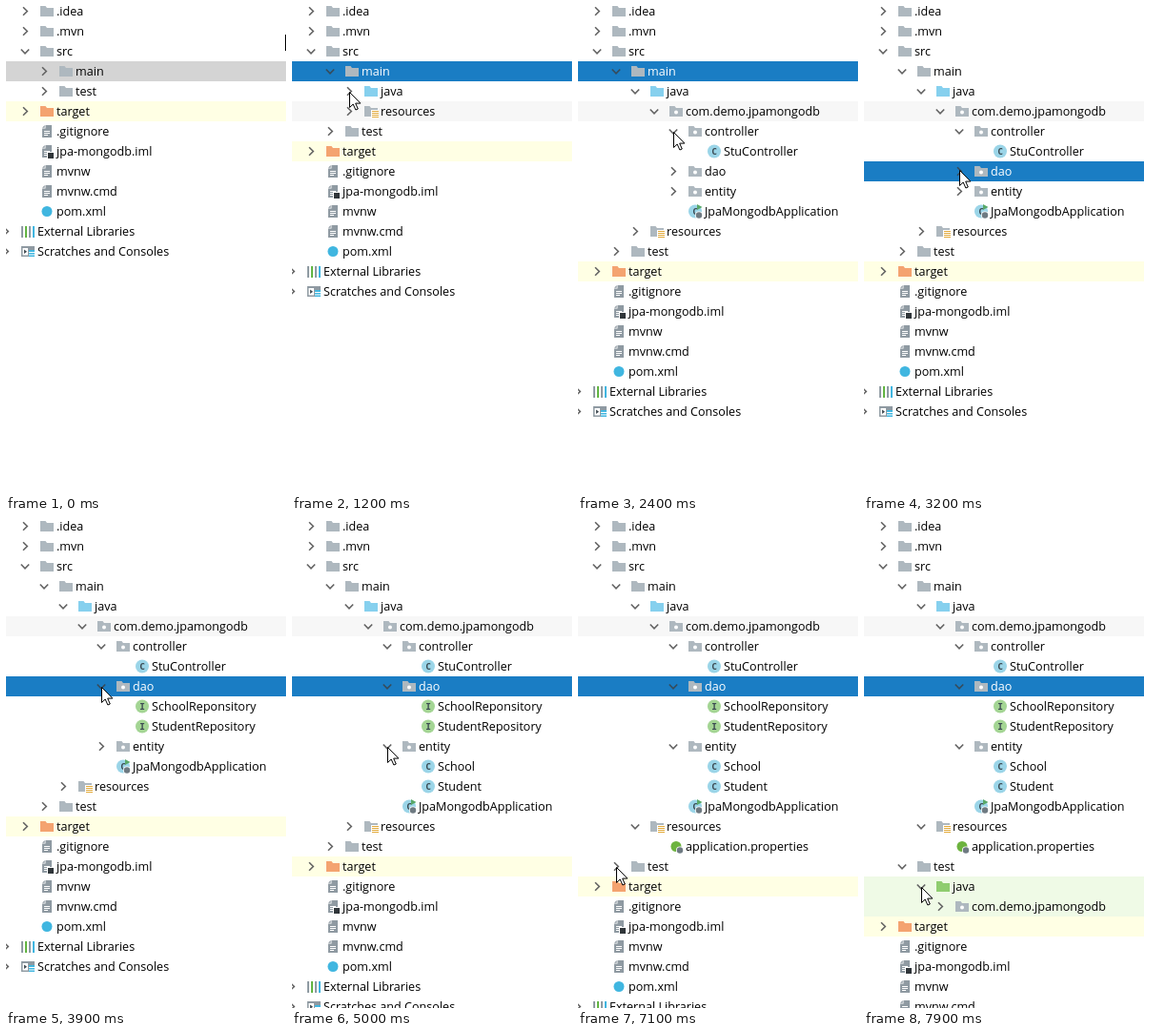
An HTML page for the animation above (8000 ms loop, 294x511 px).

```html
<!DOCTYPE html>
<html lang="en">
<head>
<meta charset="utf-8">
<title>Project tree</title>
<style>
  html, body { margin: 0; width: 100%; height: 100%; overflow: hidden; background: #fff; }
  #tree { position: absolute; left: 0; top: -5px; width: 294px; }
  #tree svg { display: block; }
  #tree text { font: 12.6px "Open Sans", "Noto Sans", sans-serif; fill: #000; }
  #tree .letter { font: bold 9.5px "DejaVu Sans Mono", monospace; fill: #3b4a52; text-anchor: middle; }
  #tree .gray { background: #d4d4d4; }
  #tree .blue { background: #1a7dc4; }
  #tree .blue .label { fill: #fff; }
  .chev { fill: none; stroke: #636363; stroke-width: 1.6; }
  .blue .chev { stroke: #374b5a; }
  #hover { position: absolute; left: 0; top: 100px; width: 294px; height: 21px; background: #f7f7f7; }
  #beam { position: absolute; left: 293px; top: 30px; width: 1px; height: 17px; background: #000; }
  #arrow { position: absolute; left: 0; top: 0; overflow: visible; }
</style>
</head>
<body>
<div id="hover"></div>
<div id="tree"></div>
<div id="beam"></div>
<svg id="arrow" width="13" height="20">
  <path d="M.5 .5V16.5L4.2 13L6.9 19L9.3 18L6.7 12.1H11.9Z" fill="#fff" stroke="#000"/>
</svg>
<script>
const LOOP = 8000, STEP = 100, ROW = 21, INDENT = 20;
const GRAY = '#aeb8bf', SLATE = '#8f9aa2', SKY = '#9bd5e8', CYAN = '#40b6e0', LIME = '#effae6';

const shape = (d, fill) => `<path d="${d}" fill="${fill}"/>`;
const lines = (d, color) => `<path d="${d}" stroke="${color}"/>`;
const dot = (x, y, r, fill) => `<circle cx="${x}" cy="${y}" r="${r}" fill="${fill}"/>`;
const folder = color => shape('M0 2H5.5L7 4H14V13H0Z', color);
const disc = (color, letter) => dot(7, 7.5, 7, color) + `<text class="letter" x="7" y="11">${letter}</text>`;
const badge = dot(11, 11.5, 4, '#fff') + dot(11, 11.5, 3.2, '#6e7a82');
const page = shape('M5.5 1H12V14H2V4.5H5.5Z', SLATE) + shape('M2 3.7L4.7 1V3.7Z', SLATE) +
  lines('M4 7.5H10M4 9.5H10M4 11.5H8', '#fff');

const icons = {
  dir: folder(GRAY),
  java: folder('#86d0ee'),
  tests: folder('#8fcd6f'),
  target: folder('#f4a370'),
  pack: folder(GRAY) + dot(7, 8.5, 2, '#fff'),
  res: folder(GRAY) + shape('M7 6H15V15H7Z', '#fff') + lines('M8 7.5H15M8 9.5H15M8 11.5H15M8 13.5H15', '#e2a938'),
  file: page,
  module: page + shape('M7 8H14V15H7Z', '#fff') + shape('M8 9H14V15H8Z', '#30363a'),
  cls: disc(SKY, 'C'),
  face: disc('#a4d594', 'I'),
  app: disc(SKY, 'C') + shape('M9 0L14.5 3L9 6Z', '#59a869') + badge,
  props: dot(7, 7.5, 5.5, '#6db33f') + badge,
  build: dot(7, 7.5, 5.5, CYAN),
  libs: [SLATE, '#62b543', SLATE, CYAN].map((c, i) => shape(`M${i * 4} 2h2v12h-2Z`, c)).join(''),
  scratch: shape('M0 2H14V13H0Z', SLATE) + shape('M1.5 4H7V11.5H1.5Z', '#fff') +
    shape('M3 5.5L6 7.7L3 10Z', '#414b52') + shape('M8 6H14V13H8Z', CYAN) + lines('M8 8.5H14M8 11H14', '#fff')
};

// open: time of the click that unfolds a node (Infinity = stays folded, undefined = leaf)
const node = (name, icon, open, kids = [], bg = '') => ({ name, icon, open, kids, bg });
const closed = (name, icon, bg) => node(name, icon, Infinity, [], bg);
const leaf = (name, icon) => node(name, icon);

const dao = node('dao', 'pack', 3500, [leaf('SchoolReponsitory', 'face'), leaf('StudentRepository', 'face')]);
const main = node('main', 'dir', 600, [
  node('java', 'java', 1400, [
    node('com.demo.jpamongodb', 'pack', 1900, [
      node('controller', 'pack', 2400, [leaf('StuController', 'cls')]),
      dao,
      node('entity', 'pack', 5000, [leaf('School', 'cls'), leaf('Student', 'cls')]),
      leaf('JpaMongodbApplication', 'app')
    ])
  ]),
  node('resources', 'res', 6000, [leaf('application.properties', 'props')])
]);
const test = node('test', 'dir', 7200, [
  node('java', 'tests', 7700, [closed('com.demo.jpamongodb', 'pack', LIME)], LIME)
]);
const project = [
  closed('.idea', 'dir'),
  closed('.mvn', 'dir'),
  node('src', 'dir', 0, [main, test]),
  closed('target', 'target', '#ffffe4'),
  leaf('.gitignore', 'file'),
  leaf('jpa-mongodb.iml', 'module'),
  leaf('mvnw', 'file'),
  leaf('mvnw.cmd', 'file'),
  leaf('pom.xml', 'build')
];
const extras = [closed('External Libraries', 'libs'), closed('Scratches and Consoles', 'scratch')];

const get = id => document.getElementById(id);
const tree = get('tree'), hover = get('hover'), beam = get('beam'), arrow = get('arrow');
const all = [];

// shown: time at which all ancestors are open
function build(n, depth, parent, shown) {
  n.x = INDENT * (depth + 1);
  n.shown = shown;
  const box = document.createElement('div');
  box.innerHTML = `<svg width="294" height="${ROW}" style="background:${n.bg}">` +
    (n.open === undefined ? '' : `<path class="chev" transform="translate(${n.x} 10.5)"/>`) +
    `<g transform="translate(${n.x + 16} 3)">${icons[n.icon]}</g>` +
    `<text class="label" x="${n.x + 33}" y="15">${n.name}</text></svg><div></div>`;
  [n.row, n.list] = box.children;
  n.chev = n.row.querySelector('.chev');
  parent.append(box);
  all.push(n);
  n.kids.forEach(k => build(k, depth + 1, n.list, Math.max(shown, n.open)));
}
project.forEach(n => build(n, 0, tree, 0));
extras.forEach(n => build(n, -1, tree, 0));

// The pointer glides to each chevron, rests briefly, then clicks it.
let prev = { x: 262, y: 36, end: 0 };
const moves = all.filter(n => n.open > 0 && n.open < LOOP).map(n => {
  const above = all.slice(0, all.indexOf(n)).filter(m => m.shown <= n.open).length;
  const end = n.open - 200;
  const begin = Math.max(prev.end + 300, end - 700);
  const move = { from: prev, x: n.x, y: above * ROW + 6, begin, end };
  prev = move;
  return move;
});
function pointAt(t) {
  const { from, x, y, begin, end } = moves.findLast(m => t >= m.begin) || moves[0];
  const k = Math.min(1, Math.max(0, (t - begin) / (end - begin)));
  const ease = k * k * (3 - 2 * k);
  return [from.x + (x - from.x) * ease, from.y + (y - from.y) * ease].map(Math.round);
}

const show = (el, on) => { el.style.display = on ? '' : 'none'; };

function draw(t) {
  for (const n of all) {
    const open = t >= n.open;
    show(n.list, open);
    if (n.chev) n.chev.setAttribute('d', open ? 'M-4.2 -2L0 2.3L4.2 -2' : 'M-2 -4.2L2.3 0L-2 4.2');
  }
  const daoPicked = t >= dao.open - 400;
  main.row.setAttribute('class', daoPicked ? '' : t < main.open ? 'gray' : 'blue');
  dao.row.setAttribute('class', daoPicked ? 'blue' : '');
  show(hover, t >= 800);
  show(beam, t < 100);
  show(arrow, t >= 100);
  const [x, y] = pointAt(t);
  arrow.style.transform = `translate(${x}px, ${y}px)`;
}

let last = -1;
const start = performance.now();
function tick(now) {
  const t = Math.floor(Math.max(0, now - start) % LOOP / STEP) * STEP;
  if (t !== last) draw(last = t);
  requestAnimationFrame(tick);
}
draw(0);
requestAnimationFrame(tick);
</script>
</body>
</html>
```
